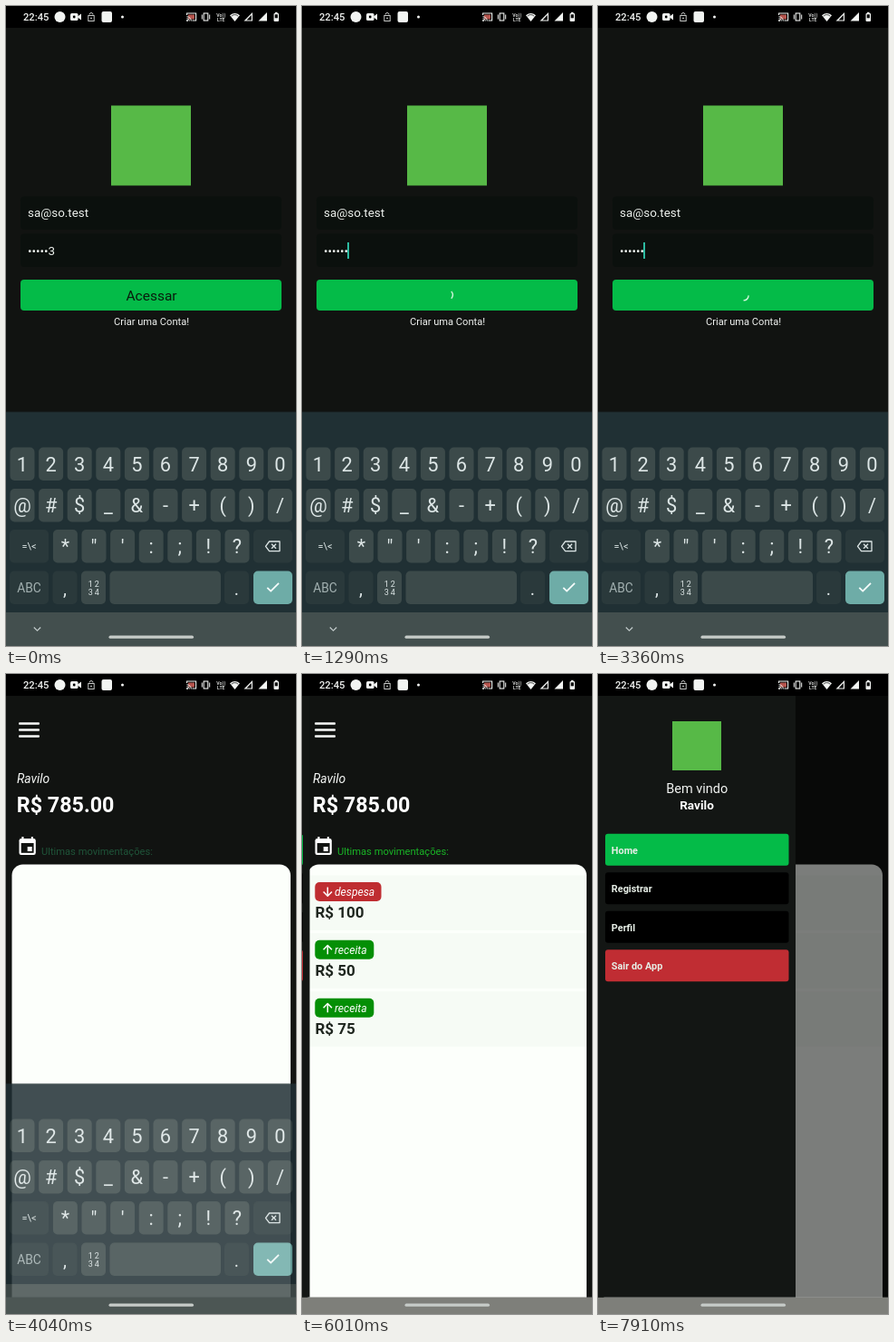
Write an HTML page with a canvas that moves like this. It is 320x704 px and loops after 8 s.

```html
<!DOCTYPE html>
<html lang="pt-BR">
<head>
<meta charset="utf-8">
<title>Controle de gastos</title>
<style>
html, body { margin: 0; width: 100%; height: 100%; overflow: hidden; background: #000; }
canvas { display: block; width: 320px; height: 704px; }
</style>
</head>
<body>
<canvas id="stage"></canvas>
<script>
const W = 320, H = 704, LOOP = 8000;
const FONT = 'Roboto, "Liberation Sans", sans-serif';
const BG = '#111311', GREEN = '#04bb48', WHITE = '#fcfffb';
const USER = 'Ravilo', EMAIL = 'sa@so.test';
const dpr = window.devicePixelRatio || 1;

function context(canvas) {
  canvas.width = W * dpr;
  canvas.height = H * dpr;
  const c = canvas.getContext('2d');
  c.scale(dpr, dpr);
  return c;
}

const screen2d = context(document.getElementById('stage'));
const layer2d = context(document.createElement('canvas'));
let ctx = screen2d;

const clamp = v => Math.max(0, Math.min(1, v));
const ease = v => v * v * (3 - 2 * v);

const STEPS = [[0, 1], [100, 13], [2240, 7], [3360, 7], [4470, 1], [6010, 1], [7130, 5], [7910, 1]]
  .flatMap(([start, n]) => Array.from({ length: n }, (_, i) => start + 170 * i));
const hold = t => STEPS.reduce((last, s) => (s <= t ? s : last), 0);

function box(x, y, w, h, color, r = 0) {
  ctx.fillStyle = color;
  ctx.beginPath();
  ctx.roundRect(x, y, w, h, r);
  ctx.fill();
}

function text(str, x, y, size, color, style = '', align = 'left') {
  ctx.font = `${style} ${size}px ${FONT}`;
  ctx.fillStyle = color;
  ctx.textAlign = align;
  ctx.fillText(str, x, y);
}

function line(points, color, width) {
  ctx.strokeStyle = color;
  ctx.lineWidth = width;
  ctx.beginPath();
  points.forEach(([x, y]) => ctx.lineTo(x, y));
  ctx.stroke();
}

function shape(points, color) {
  ctx.fillStyle = color;
  ctx.beginPath();
  points.forEach(([x, y]) => ctx.lineTo(x, y));
  ctx.fill();
}

function disc(x, y, r, color) {
  ctx.fillStyle = color;
  ctx.beginPath();
  ctx.arc(x, y, r, 0, 7);
  ctx.fill();
}

function arc(x, y, r, from, to, color, width) {
  ctx.strokeStyle = color;
  ctx.lineWidth = width;
  ctx.beginPath();
  ctx.arc(x, y, r, from, to);
  ctx.stroke();
}

// Draws a whole group with one opacity, moved down by dy.
function group(alpha, dy, draw) {
  if (alpha <= 0) return;
  layer2d.clearRect(0, 0, W, H);
  ctx = layer2d;
  draw();
  ctx = screen2d;
  ctx.globalAlpha = alpha;
  ctx.drawImage(layer2d.canvas, 0, dy, W, H);
  ctx.globalAlpha = 1;
}

function statusBar() {
  const c = '#f2f4f2';
  box(0, 0, W, 24, '#000');
  text('22:45', 19, 16, 11.2, c, '500');
  disc(59.5, 12, 6, c);
  // camera
  box(71, 8, 8.5, 8, c, 1.5);
  shape([[79, 11.5], [83, 8.5], [83, 15.5], [79, 12.5]], c);
  disc(75.2, 12, 1.4, '#000');
  // padlock
  arc(94, 9.5, 2, Math.PI, 2 * Math.PI, '#c4c6c4', 1);
  ctx.strokeRect(90.8, 10.5, 6.4, 6);
  disc(94, 13.5, 0.9, '#c4c6c4');
  box(105.5, 6, 11.5, 12, c, 2);
  disc(128.5, 12, 1.5, c);
  // cast
  line([[199.6, 10], [199.6, 8], [209.6, 8], [209.6, 16], [205.5, 16]], c, 1.1);
  box(201, 9.5, 7, 5, '#b5544d');
  disc(200, 16, 1, c);
  arc(199.5, 16.5, 2.8, -Math.PI / 2, 0, c, 1);
  arc(199.5, 16.5, 4.8, -Math.PI / 2, 0, c, 1);
  // vibrate
  ctx.lineWidth = 1.1;
  ctx.strokeRect(218.2, 8, 4.6, 8);
  line([[216.3, 9.5], [216.3, 14.5]], c, 1);
  line([[224.7, 9.5], [224.7, 14.5]], c, 1);
  text('Vo))', 237.3, 11.5, 5.2, c, '500', 'center');
  text('LTE', 237.3, 16.8, 5.2, c, '500', 'center');
  // wifi
  ctx.fillStyle = c;
  ctx.beginPath();
  ctx.moveTo(252.5, 17);
  ctx.lineTo(247, 10.2);
  ctx.quadraticCurveTo(252.5, 5.6, 258, 10.2);
  ctx.fill();
  arc(252.5, 15.5, 5.7, -2.3, -0.85, '#000', 0.7);
  // signal
  for (const x of [262.5, 278.5]) {
    shape([[x, 16.5], [x + 9.5, 7], [x + 9.5, 16.5]], c);
  }
  shape([[265.5, 15.5], [270.8, 10], [270.8, 15.5]], '#000');
  // battery
  box(295.5, 8, 5.5, 9, c, 1);
  box(297, 6.8, 2.5, 2, c);
  box(296.7, 9.3, 3.1, 4, '#000');
}

function spinner(t) {
  const cycle = (t - 1290) / 1035;
  const n = Math.floor(cycle), p = cycle - n, rad = Math.PI / 180;
  const base = 292.5 * cycle + 270 * n - 40;
  const head = base + 80 + 270 * ease(clamp(2 * p));
  const tail = base + 270 * ease(clamp(2 * p - 1));
  arc(160, 317.8, 6.2, tail * rad, head * rad, '#d8f7df', 1.3);
}

function login(t) {
  box(0, 24, W, H - 24, BG);
  box(116, 109.5, 88, 88, '#57b947');
  box(16, 209.5, 288, 36.5, '#0b100d', 4);
  box(16, 250.5, 288, 36.5, '#0b100d', 4);
  text(EMAIL, 24, 232, 13.4, '#eef2ee');
  text(t < 610 ? '•••••3' : '••••••', 24, 273.8, 13.4, '#eef2ee');
  if ((t + 710) % 1000 < 500) box(50, 260, 2, 18, '#2cbaa0');
  box(16, 301, 288, 34, GREEN, 4);
  if (t < 950) text('Acessar', 160.5, 324, 15.5, '#0a1c0d', '', 'center');
  else spinner(t);
  text('Criar uma Conta!', 160.5, 351, 11.1, '#f2f4f2', '', 'center');
}

function keyboard(resting) {
  const key = '#3c4a4a', dark = '#2a393b', ink = '#dde6e6', dim = '#a3b1b1';
  const top = [485.5, 531, 576, 621.5], kh = 36.5;
  const keyX = i => 4.5 + 31.6 * i;
  const letter = (s, i, row) => {
    box(keyX(i), top[row], 27, kh, key, 5);
    text(s, keyX(i) + 13.5, top[row] + 26.3, 21.8, ink, '', 'center');
  };
  box(0, 446.5, W, H - 446.5, '#203034');
  [...'1234567890'].forEach((s, i) => letter(s, i, 0));
  [...'@#$_&-+()/'].forEach((s, i) => letter(s, i, 1));
  [...'*"\':;!?'].forEach((s, i) => letter(s, i + 1.5, 2));

  box(4, top[2], 43, kh, dark, 5);
  text('=\\<', 25.5, 598, 11, ink, '', 'center');
  box(273, top[2], 43, kh, dark, 5);
  ctx.lineJoin = 'round';
  line([[286.5, 594.3], [290.5, 589], [302, 589], [302, 599.6], [290.5, 599.6], [286.5, 594.3], [288, 592.3]], ink, 1.3);
  line([[293, 591.8], [298, 596.8]], ink, 1.3);
  line([[298, 591.8], [293, 596.8]], ink, 1.3);

  box(4, top[3], 43, kh, dark, 5);
  text('ABC', 25.5, 645, 13.8, dim, '', 'center');
  box(51.5, top[3], 27, kh, dark, 5);
  text(',', 65, 647.5, 20, ink, '', 'center');
  box(83, top[3], 27, kh, key, 5);
  ['12', '34'].forEach((pair, row) => [...pair].forEach((s, i) =>
    text(s, 93.2 + 7 * i, 638.5 + 9.5 * row, 9, ink, '', 'center')));
  box(114.5, top[3], 122.5, kh, key, 5);
  box(241, top[3], 27, kh, dark, 5);
  text('.', 254.5, 648, 20, ink, '', 'center');
  box(273, top[3], 43, kh, '#6eaca7', 5);
  line([[288.3, 639.8], [292.2, 643.7], [301, 634.8]], '#f4fbfa', 1.8);

  box(0, 667, W, H - 667, '#434f4e');
  if (resting) line([[30.8, 683.5], [34.5, 687.2], [38.2, 683.5]], '#c3cccc', 1.2);
}

function entry(y, kind, value, out) {
  box(8, y, 306, 60.5, '#f6fbf5');
  box(14.3, y + 7.5, out ? 73.2 : 65, 21, out ? '#bf2d31' : '#048f05', 5);
  const mid = y + 18, d = out ? 1 : -1;
  line([[28.3, mid - 5 * d], [28.3, mid + 4.5 * d]], '#fff', 1.5);
  line([[23.6, mid], [28.3, mid + 4.8 * d], [33, mid]], '#fff', 1.5);
  text(kind, 36, y + 22.6, 12.1, '#fff', 'italic');
  text('R$ ' + value, 14.5, y + 46.5, 17, '#1f261f', 'bold');
}

function home(t) {
  box(0, 24, W, H - 24, BG);
  for (const y of [53.3, 60.3, 67.3]) box(14, y, 23, 2.4, '#f7f9f7', 1);
  text(USER, 12, 120, 13.9, '#f4f6f4', 'italic');
  text('R$ 785.00', 11.8, 152, 23.3, '#fff', 'bold');
  // calendar
  box(14.5, 181, 18.3, 18, '#fff', 2.2);
  box(17.3, 179, 2.2, 4, '#fff');
  box(27.8, 179, 2.2, 4, '#fff');
  box(16.7, 186, 13.9, 10.8, BG);
  box(23.7, 190, 5, 5, '#fff');
  text('Ultimas movimentações:', 39, 198.8, 11.15, t < 4200 ? '#1f5439' : '#19b526');
  box(6.5, 209.5, 307.5, 480, WHITE, [12, 12, 0, 0]);
  if (t >= 4380) {
    entry(221.5, 'despesa', 100, true);
    entry(285.3, 'receita', 50, false);
    entry(349.3, 'receita', 75, false);
  }
  box(0, 685.5, W, H - 685.5, '#7e7f7a');
}

// Right edge of the side menu, which first peeks out by 8.5 px.
const PEEK = 8.5, OPEN = 218;
function drawerEdge(t) {
  if (t < 6010) return 0;
  return t < 7130 ? PEEK : OPEN - 26 * Math.exp((7130 - t) / 80);
}

function drawer(edge) {
  const shade = 0.51 * (edge - PEEK) / (OPEN - PEEK);
  box(0, 24, W, 661.5, `rgba(0, 0, 0, ${shade})`);
  ctx.save();
  ctx.translate(edge - OPEN, 0);
  box(0, 24, OPEN, 661.5, '#131614');
  box(82, 52, 54, 54, '#57b947');
  text('Bem vindo', 109.3, 131, 14.5, '#f2f4f2', '', 'center');
  text(USER, 109, 149, 13.6, '#fff', 'bold', 'center');
  const items = [['Home', GREEN], ['Registrar', '#000'], ['Perfil', '#000'], ['Sair do App', '#c02d33']];
  items.forEach(([label, color], i) => {
    const y = 175.7 + 42.5 * i;
    box(8, y, 202.5, 35, color, 3);
    text(label, 14.8, y + 22, 10.9, '#e6eee6', 'bold');
  });
  ctx.restore();
}

function draw(t) {
  const shown = ease(clamp((t - 3640) / 280));
  const keys = clamp(1 - (t - 3989) / 340);
  if (shown < 1) login(t);
  group(shown, 0, () => home(t));
  group(keys, 27 * (1 - keys), () => keyboard(keys === 1));
  const edge = drawerEdge(t);
  if (edge > 0) drawer(edge);
  box(113.5, 692.6, 93.5, 3.2, '#c6cbc8', 1.6);
  statusBar();
}

const begin = performance.now();
function tick() {
  draw(hold((performance.now() - begin) % LOOP));
  requestAnimationFrame(tick);
}
tick();
</script>
</body>
</html>
```
